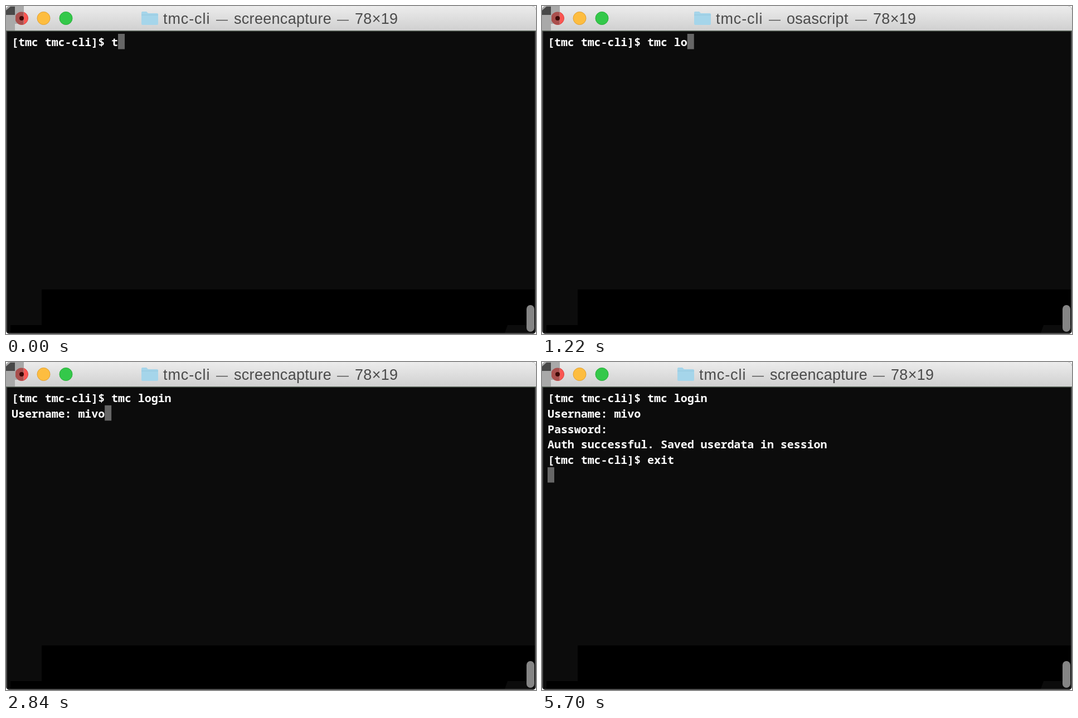
Recreate the animation shown at these times as an HTML page. Size 951 px wide and 589 px high, loop 6580 ms.

```html
<!DOCTYPE html>
<html lang="en">
<head>
<meta charset="utf-8">
<title>tmc login</title>
<style>
  html, body { margin: 0; width: 100%; height: 100%; overflow: hidden; background: #fff; }
  svg { display: block; width: 951px; height: 589px; }
  #lines text {
    font: 600 20px "Noto Sans Mono", "DejaVu Sans Mono", monospace;
    letter-spacing: -0.06px; white-space: pre; fill: #fff;
  }
  #title text { font: 27px "Liberation Sans", Arial, sans-serif; fill: #4b4b4b; letter-spacing: .3px; }
  #title .dash { font-size: 21px; letter-spacing: 0; }
  #title .app { letter-spacing: .9px; }
</style>
</head>
<body>
<svg viewBox="0 0 951 589">
  <defs>
    <linearGradient id="bar" x2="0" y2="1">
      <stop offset="0" stop-color="#ececec"/>
      <stop offset="1" stop-color="#d0d0d0"/>
    </linearGradient>
    <clipPath id="win"><rect width="951" height="589" rx="7"/></clipPath>
  </defs>
  <g clip-path="url(#win)">
    <rect width="951" height="589" fill="#0c0c0c"/>
    <path d="M64 509H949V573H900L895 587H8V573H64Z" fill="#000"/>
    <path d="M1 45V588H950V45" fill="none" stroke="#4c4c4c" stroke-width="2"/>
    <rect width="951" height="44" fill="url(#bar)"/>
    <rect y="44" width="951" height="1.5" fill="#5d685d"/>
    <circle cx="28" cy="22" r="11.5" fill="#fb5652" stroke="#d94643"/>
    <path d="M0 0H32V32H16V44H0Z" fill="#a9a9a9"/>
    <path d="M31.5 11.1A11.5 11.5 0 0 0 17 18V26A11.5 11.5 0 0 0 31.5 32.9Z" fill="#a94f4d"/>
    <path d="M0 16V8L8 1H16V16Z" fill="#484848"/>
    <circle cx="28" cy="22" r="4" fill="#3d0907"/>
    <circle cx="67.5" cy="22" r="11.5" fill="#fdbd40" stroke="#e0a035"/>
    <circle cx="107.5" cy="22" r="11.5" fill="#34c84a" stroke="#28ad39"/>
    <rect x="934" y="537" width="14" height="48" rx="7" fill="#858585"/>
  </g>
  <g id="title">
    <path d="M0 12Q0 10 2 10H9L12 13H28Q30 13 30 15V32Q30 34 28 34H2Q0 34 0 32Z" fill="#a5d5ea"/>
    <path d="M0 16H30" stroke="#94c6dc"/>
    <text class="app" x="39" y="32">tmc-cli</text>
    <text class="dash" x="134" y="31">—</text>
    <text id="proc" x="166" y="32"></text>
    <text class="dash" id="dash" y="31">—</text>
    <text id="size" y="32">78×19</text>
  </g>
  <rect id="cursor" width="12" height="27.5" fill="#666"/>
  <g id="lines"></g>
</svg>
<script>
const LOOP = 6580, COL = 11.94, ROW = 27.8, ROWS = 6;
const $ = id => document.getElementById(id);

const prompt = "[tmc tmc-cli]$ ";
const command = prompt + "tmc login\n";
const user = command + "Username: ";
const pass = user + "mivo\n";
const done = pass + "Password: \nAuth successful. Saved userdata in session\n";

// Screen contents by start time; the cursor follows the last character.
const steps = [];
const show = (time, text) => steps.push({ time, text });
const type = (base, word, times) =>
  times.forEach((time, i) => show(time, base + word.slice(0, i + 1)));

type(prompt, "tmc login", [0, 560, 820, 970, 1030, 1220, 1440, 1500, 1640]);
show(1740, command);
show(2080, user);
type(user, "mivo", [2100, 2580, 2660, 2840]);
show(2930, pass);
show(3170, pass + "Password: ");
show(3270, pass + "Password: \n");
show(4370, done);
show(5600, done + prompt);
show(5700, done + prompt + "exit\n");

const titles = {
  screencapture: { x: 243, dash: 351 },
  osascript: { x: 273, dash: 289 }
};

const lines = Array.from({ length: ROWS }, (_, i) => {
  const el = document.createElementNS("http://www.w3.org/2000/svg", "text");
  el.setAttribute("x", 10);
  el.setAttribute("y", 72 + i * ROW);
  return $("lines").appendChild(el);
});

function setTitle(name) {
  const { x, dash } = titles[name];
  $("title").setAttribute("transform", `translate(${x})`);
  $("proc").textContent = name;
  $("dash").setAttribute("x", dash);
  $("size").setAttribute("x", dash + 32);
}

function draw(t) {
  const rows = steps.findLast(s => s.time <= t).text.split("\n");
  lines.forEach((el, i) => { el.textContent = rows[i] || ""; });
  const last = rows.length - 1;
  $("cursor").setAttribute("x", 10 + rows[last].length * COL);
  $("cursor").setAttribute("y", 50 + last * ROW);
  const scripting = (t >= 560 && t < 820) || (t >= 1220 && t < 1440);
  setTitle(scripting ? "osascript" : "screencapture");
}

const start = performance.now();
function tick() {
  draw((performance.now() - start) % LOOP);
  requestAnimationFrame(tick);
}
tick();
</script>
</body>
</html>
```
